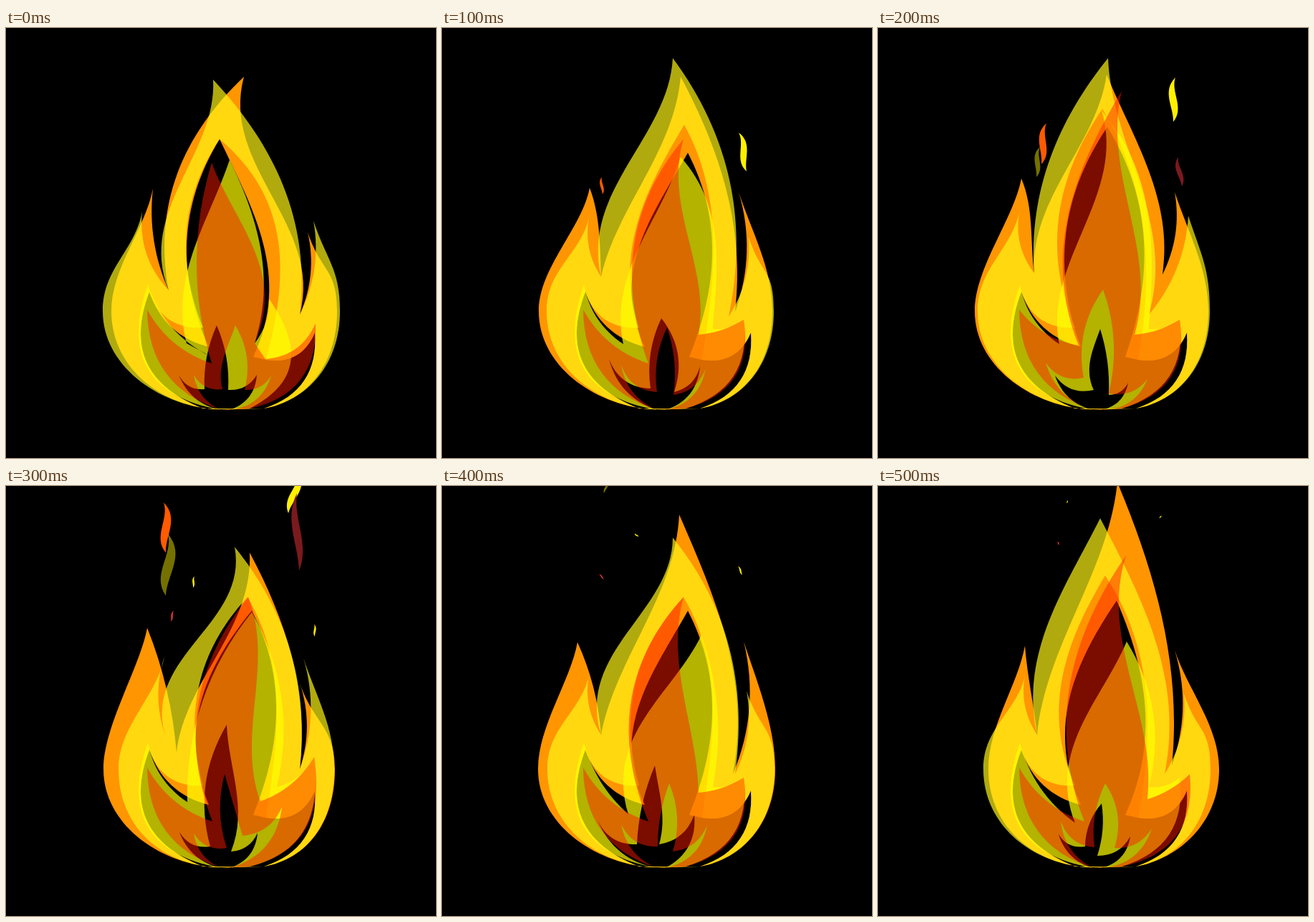
Write an HTML page with a canvas that moves like this. It is 600x600 px and loops after 0.6 s.

```html
<!DOCTYPE html>
<html lang="en">
<head>
<meta charset="utf-8">
<title>Fire</title>
<style>
html, body { margin: 0; height: 100%; overflow: hidden; background: #000; }
canvas { display: block; width: 100vw; height: 100vh; }
</style>
</head>
<body>
<canvas id="stage" width="600" height="600"></canvas>
<script>
const ctx = document.getElementById('stage').getContext('2d');
const parse = text => text.split(' ').map(t => t.split(',').map(Number));

// Curve from a to b, pushed sideways at each third by a percentage of its length.
function edge(path, [ax, ay], [bx, by, b1 = 0, b2 = b1]) {
  const dx = bx - ax, dy = by - ay, p = b1 / 100, q = b2 / 100;
  path.bezierCurveTo(ax + dx / 3 + dy * p, ay + dy / 3 - dx * p,
    bx - dx / 3 + dy * q, by - dy / 3 - dx * q, bx, by);
}

// Closed shape through corners "x,y,bend,bend"; missing bends come from the defaults.
function shape(path, text, bends = []) {
  const c = parse(text);
  path.moveTo(c[0][0], c[0][1]);
  for (let i = 1; i < c.length; i++) {
    if (c[i].length < 3) c[i].push(bends[i - 1] || 0);
    edge(path, c[i - 1], c[i]);
  }
  path.closePath();
}

// Big flame: round belly of the given reach on each side, three tips between.
function flame(path, left, text, right) {
  const c = parse(text), last = c.length - 1, [x, y] = c[0], [u, v] = c[last];
  path.moveTo(290, 532);
  path.bezierCurveTo(210, 525, left, 470, left, 395);
  path.bezierCurveTo(left, 335, x - 10, y + 55, x, y);
  c[last].push(-11);
  for (let i = 1; i <= last; i++) edge(path, c[i - 1], c[i]);
  path.bezierCurveTo(u + 18, v + 55, right, 335, right, 395);
  path.bezierCurveTo(right, 470, 420, 520, 360, 531);
  path.closePath();
}

function fill(color, path) {
  ctx.fillStyle = color;
  ctx.fill(path, 'evenodd');
}

function outer(color, left, text, right, hole) {
  const path = new Path2D();
  flame(path, left, text, right);
  shape(path, hole);
  fill(color, path);
}

function inner(color, body, hole) {
  const path = new Path2D();
  shape(path, body);
  shape(path, `300,533 ${hole} 312,533`, [18, -22, 10, 10, -20, 22]);
  fill(color, path);
}

// Spurs that all poses share; only the middle tongue changes.
const spurL = '275,531 200,368,32,34', spurR = '363,463 431,425,-26 360,531,26';
const orange = (l, text, r, tip, bend) =>
  outer('#ff9500', l, text, r, `${spurL} 283,445,-18 ${tip} 345,459,${bend} ${spurR}`);
const amber = (l, text, r, tip, bend) =>
  outer('rgba(255,246,23,.69)', l, text, r, `${spurL} 275,418,-25 ${tip} 363,463,${bend} ${spurR.slice(8)}`);
const gold = (tongue, hole, right = '421,407,-14 340,531,28') =>
  inner('rgba(255,255,0,.7)', `300,533 198,358,39 ${tongue} ${right}`, hole);
const red = (tongue, hole, right = '421,407,-8 340,531,30') =>
  inner('rgba(255,27,0,.48)', `300,533 197,393,24 ${tongue} ${right}`, hole);

const SPARK = '#fff000', EMBER = '#ff5a00', OLIVE = 'rgba(255,246,0,.46)', DARK = '#7a1a1e', ROSE = '#e8333a';

// Small S-shaped leaf from end to end; side picks which way it curls.
function spark(color, a, b, side = 1) {
  const path = new Path2D();
  shape(path, `${a} ${b},${30 * side},0 ${a},${25 * side},${-10 * side}`);
  fill(color, path);
}

function wide() {
  orange(147, '205,224 227,366,-9 332,68,19,17 410,400,-18,18 421,285', 462, '298,155,17,18', '10,23');
  amber(135, '190,256 227,366,-15 289,72,22,-9 410,400,14,17 429,269', 466, '298,155,17,18', '26,17');
  gold('285,458,-14 252,440 312,184,17,3 347,440,11,16', '241,484 277,504 294,415,8 310,505,8 350,484',
    '367,378,-12 340,531,33,44');
  red('287,468,-13 287,188,10 347,440,4,26 362,462', '262,484 302,504 320,415,16,4 333,505,14 370,485',
    '432,412,-20 340,531,28');
}

function rise() {
  orange(135, '206,223 222,347,8,3 333,68,5,-10 409,396,9,12 414,229', 461, '343,174,26,10', '17,14');
  amber(146, '206,260 222,347,-14 322,42,20,-9 400,403,15 428,292', 463, '338,135,20,11', '15,8');
  gold('253,441,-14 333,180,18,0 378,420,20,9', '233,462 291,503 306,405 324,508,18 360,472');
  red('288,468,-13 337,155,18,20 358,428,-13,9', '250,470 300,508 314,418 323,512,8 368,475');
  spark(EMBER, '223,208', '224,232', -1);
  spark(SPARK, '414,146', '425,200');
}

function lean() {
  orange(135, '200,210 218,342,9,0 319,65,14,-7 397,344,4,15 414,229', 461, '320,138,17', '17,15');
  amber(139, '198,253 218,342,-15 321,42,14,12 378,400,-4,16 433,262', 463, '313,113,19,17', '14,11');
  gold('253,441,-14 312,115,13,-17 378,420,18,10', '247,485 301,505 310,420,20,8 322,512,6 349,495');
  red('280,443,-13 340,88,20,13 358,428,-10,12', '234,467 287,488 314,365,14 322,510 376,490');
  spark(SPARK, '415,69', '412,131', -1);
  spark(EMBER, '235,133', '228,190', -1);
  spark(OLIVE, '226,166', '221,208', -1);
  spark(DARK, '419,180', '424,221', -1);
}

function sway() {
  orange(136, '197,198 238,372,5 340,93,8,-14 410,395,9,12 410,275', 459, '343,174,23,17', '17,14');
  amber(157, '221,238 222,347,-11 319,85,24,-20 410,395,14 415,240', 458, '337,155,18,19', '16,8');
  gold('253,441,-14 343,176,12 378,420,13', '242,483 285,503 308,333,14 314,510,0,15 351,484',
    '430,378,-15 340,531,25,34');
  red('288,468,-13 338,155,19 355,440,11,-10', '262,485 308,505 305,402 330,488,0 385,448',
    '430,378,-12 340,531,27,34');
  spark(EMBER, '220,23', '223,93');
  spark(OLIVE, '226,67', '223,153');
  spark(SPARK, '409,-20', '394,38');
  spark(DARK, '406,10', '409,118', -.6);
  spark(SPARK, '263,126', '261,142', -1);
  spark(ROSE, '234,174', '230,189', -1);
  spark(SPARK, '430,193', '431,210');
}

function reach() {
  orange(134, '189,218 222,347,6 331,40,5,-10 406,402,7,14 421,217', 465, '343,174,26,10', '17,14');
  amber(147, '206,260 222,347,-14 322,72,25,-12 409,402,15,14 425,286', 464, '337,155,18,19', '16,8');
  gold('260,458,-10 362,208,27,2 378,420,9', '217,466 272,500 297,390,6 303,500,3,12 352,458');
  red('288,468,-13 337,155,20,22 358,428,-12,2', '250,472 301,503 317,415,6 322,510,12 370,473');
  spark(OLIVE, '231,-6', '226,10');
  spark(SPARK, '269,66', '274,71', -1.5);
  spark(ROSE, '219,123', '226,130');
  spark(SPARK, '413,112', '419,124');
}

function peak() {
  orange(154, '205,223 222,347,-2,1 334,-5,7,-7 410,390,7,10 414,229', 476, '333,160,23,15', '13,17');
  amber(147, '206,260 222,347,-14 310,45,18,6 400,402,8,16 427,290', 464, '317,125,21,14', '16,11');
  gold('275,470,-12 347,217,25,4 378,420,14', '252,486 289,503 312,443,12 306,516,8 352,489');
  red('288,468,-13 346,97,19,16 376,437,-14,7', '255,467 302,504 317,415 330,505,16 382,478',
    '435,402,-8 340,531,30');
  spark(SPARK, '264,20', '264,24', 2);
  spark(SPARK, '395,41', '393,45', 2);
  spark(ROSE, '250,78', '253,82', 2);
}

const poses = [wide, rise, lean, sway, reach, peak];
let shown;
function tick() {
  const pose = poses[Math.floor(performance.now() / 100) % poses.length];
  if (pose !== shown) {
    shown = pose;
    ctx.fillStyle = '#000';
    ctx.fillRect(0, 0, 600, 600);
    pose();
  }
  requestAnimationFrame(tick);
}
tick();
</script>
</body>
</html>
```
